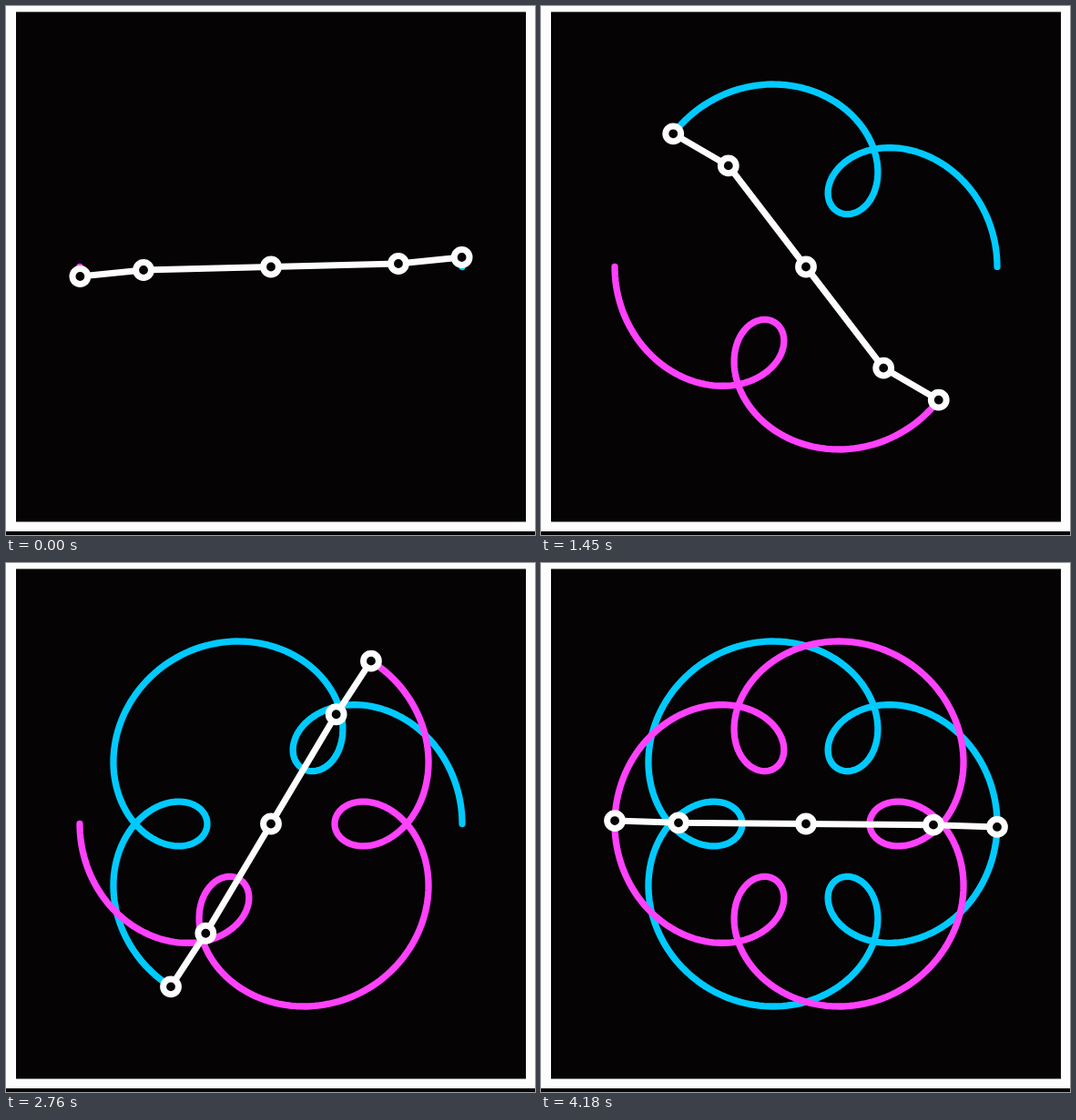
Write an HTML page with a canvas that moves like this. It is 581 px wide and 581 px high and loops after 4210 ms.

```html
<!DOCTYPE html>
<html lang="en">
<head>
<meta charset="utf-8">
<title>Linked arms</title>
<style>
  html, body { margin: 0; width: 100%; height: 100%; overflow: hidden; background: #fdfdfd; }
  canvas { display: block; }
</style>
</head>
<body>
<canvas id="stage" width="581" height="581"></canvas>
<script>
const ctx = document.getElementById('stage').getContext('2d');
const SIZE = 581, LOOP = 4210, STEPS = 126, TURN = 0.05, LEAD = 0.62;
const CX = 291, CY = 286.5, LONG = 140, SHORT = 70;
const INK = '#050304', WHITE = '#fdfdfd', BLUE = '#00caff', PINK = '#ff42fd';

// The arms advance in even steps of TURN radians.
function angleAt(ms) {
  const step = Math.min(STEPS - 1, Math.floor(ms / LOOP * STEPS + LEAD));
  return TURN * (step + 0.5);
}

const polar = ([x, y], r, a) => [x + r * Math.cos(a), y - r * Math.sin(a)];
const elbow = (a, side) => polar([CX, CY], side * LONG, a);
const tip = (a, side) => polar(elbow(a, side), side * SHORT, 4 * a);

function polyline(points, color, width) {
  ctx.strokeStyle = color;
  ctx.lineWidth = width;
  ctx.beginPath();
  points.forEach(p => ctx.lineTo(...p));
  ctx.stroke();
}

function trail(end, side, color) {
  const points = [];
  for (let a = 0; a < end; a += TURN / 4) points.push(tip(a, side));
  points.push(tip(end, side));
  polyline(points, color, 7.3);
}

function ring([x, y]) {
  ctx.beginPath();
  ctx.arc(x, y, 8.4, 0, 2 * Math.PI);
  ctx.fill();
  ctx.stroke();
}

function draw(ms) {
  const angle = angleAt(ms);
  ctx.fillStyle = WHITE;
  ctx.fillRect(0, 0, SIZE, SIZE);
  ctx.fillStyle = INK;
  ctx.fillRect(CX - 280, CY - 280, 560, 560);
  ctx.fillRect(0, 577, SIZE, 4);

  ctx.lineCap = ctx.lineJoin = 'round';
  trail(angle, 1, BLUE);
  trail(angle, -1, PINK);

  const joints = [tip(angle, -1), elbow(angle, -1), [CX, CY], elbow(angle, 1), tip(angle, 1)];
  polyline(joints, WHITE, 7);
  joints.forEach(ring);
}

function tick() {
  draw(performance.now() % LOOP);
  requestAnimationFrame(tick);
}
tick();
</script>
</body>
</html>
```
